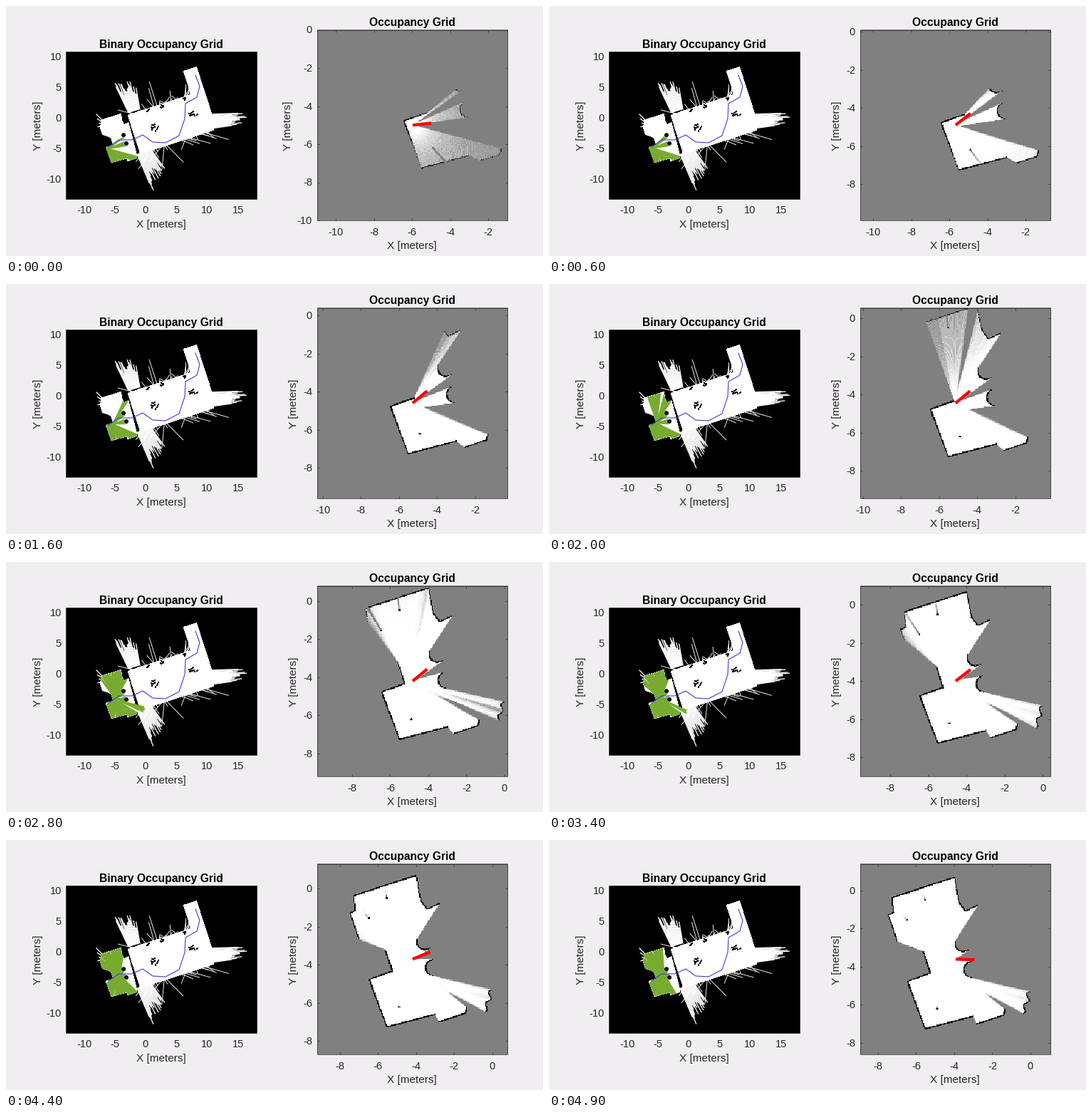
Animation of 754 by 351 pixels, one loop 5 s. Source, as a matplotlib script:

```python
import numpy as np
import matplotlib.pyplot as plt
from matplotlib.animation import FuncAnimation
from matplotlib.collections import LineCollection
from matplotlib.patches import Circle, Polygon, Rectangle

plt.rcParams["font.family"] = "Liberation Sans"

W, H, DPI = 754, 351, 100
FRAMES, INTERVAL = 50, 100
PT = 72 / DPI
CELL, MAX_RANGE, BEAMS = 0.05, 5.0, 440
FREE, HIT = 0.5, 1.3                      # log-odds steps
GRID_LEFT, GRID_TOP, ROWS, COLS = -12.0, 2.0, 240, 262
VIEW = 200                                # local window in cells
BOX_L = (84, 64, 351.5, 270.5)            # left, top, right, bottom in pixels
BOX_R = (436.5, 33.5, 704, 301)
SCALE_L, SCALE_R = 8.65, 26.75            # pixels per metre
TILT = np.radians(18)
SPEED, LAG = 0.51, 0.2
INK = "#262626"


def tilted(points):
    """Building axes to world metres."""
    c, s = np.cos(TILT), np.sin(TILT)
    return np.asarray(points) @ np.array([[c, s], [-s, c]])


def to_left(points):
    """World metres to pixels of the left panel."""
    return np.asarray(points) * [SCALE_L, -SCALE_L] + [196, 157]


def ring(x, y, r):
    a = np.linspace(0, 2 * np.pi, 17)
    return np.column_stack([x + r * np.cos(a), y + r * np.sin(a)])


def far_wall():
    """Ragged arc that only partly comes within range."""
    deg = np.linspace(-9.5, -23, 24)
    r = 5.05 - 0.1 * np.cos(2 * np.pi * (deg + 11.5) / 7)
    a = np.radians(deg)
    return np.column_stack([-5.1 + r * np.cos(a), -4.45 + r * np.sin(a)])


ROOMS = tilted([(-3.25, -5.5), (-3.4, -5.76), (-4.9, -5.76), (-4.9, -5.32),
                (-7.5, -5.17), (-7.6, -2.57), (-6.32, -2.54), (-6.33, -1.3),
                (-7.47, -0.4), (-7.5, 1.05), (-7.2, 1.1), (-7.05, 1.86),
                (-3.63, 1.86), (-3.8, 0.55), (-3.63, 0), (-2.9, 0.1)])
PILLARS = [(-3.58, -2.8), (-3.12, -4.16)]
POSTS = [(-4.92, -6.22), (-5.55, -0.5), (-6.5, -1.55)]

WALLS = [ROOMS, far_wall()]
WALLS += [ring(x, y, 0.43) for x, y in PILLARS]
WALLS += [ring(x, y, 0.05) for x, y in POSTS]
WALL_A = np.concatenate([p[:-1] for p in WALLS])
WALL_B = np.concatenate([p[1:] for p in WALLS])


def aim(t):
    """Direction to the look-ahead point: quick turn in, late turn out."""
    return np.radians(40 - 34 * np.exp(-t / 0.2) - 42 * (t / 4.9) ** 8)


def drive():
    """The robot follows its aim with a short lag."""
    dt = INTERVAL / 1000
    mid = (np.arange(FRAMES - 1) + 0.5) * dt
    a = aim(np.maximum(mid - LAG, 0))
    steps = SPEED * dt * np.column_stack([np.cos(a), np.sin(a)])
    return np.vstack([[-6, -5], [-6, -5] + np.cumsum(steps, axis=0)])


TRACK = drive()
HEADING = aim(np.arange(FRAMES) * INTERVAL / 1000)


def scan(i):
    """Beam angles and ranges of the beams that return."""
    angle = HEADING[i] + np.linspace(-np.pi, np.pi, BEAMS, endpoint=False)
    dx, dy = np.cos(angle)[:, None], np.sin(angle)[:, None]
    ex, ey = (WALL_B - WALL_A).T
    wx, wy = (WALL_A - TRACK[i]).T
    det = dx * ey - dy * ex
    det = np.where(abs(det) < 1e-9, 1e-9, det)
    dist = (wx * ey - wy * ex) / det
    along = (wx * dy - wy * dx) / det
    hit = (dist > 0) & (along >= 0) & (along <= 1)
    reach = np.where(hit, dist, np.inf).min(axis=1)
    reach += np.random.default_rng(i).normal(0, 0.01, BEAMS)
    ok = reach < MAX_RANGE
    return angle[ok], reach[ok]


def cell_index(x, y):
    col = np.clip(((x - GRID_LEFT) / CELL).astype(int), 0, COLS - 1)
    row = np.clip(((GRID_TOP - y) / CELL).astype(int), 0, ROWS - 1)
    return row * COLS + col


def build():
    """Beam tips and the grey map after every scan."""
    odds = np.zeros(ROWS * COLS)
    steps = np.arange(0, MAX_RANGE, CELL / 2)
    tips, greys = [], []
    for i, (x, y) in enumerate(TRACK):
        angle, reach = scan(i)
        c, s = np.cos(angle), np.sin(angle)
        cells = cell_index(x + np.outer(c, steps), y + np.outer(s, steps))
        ends = cell_index(x + c * (reach + 0.02), y + s * (reach + 0.02))
        free = (steps < reach[:, None] - 0.02) & (cells != ends[:, None])
        free[:, 1:] &= cells[:, 1:] != cells[:, :-1]
        odds -= FREE * np.bincount(cells[free], minlength=odds.size)
        odds += HIT * np.bincount(ends, minlength=odds.size)
        odds = np.clip(odds, -6.9, 6.9)
        greys.append((1 / (1 + np.exp(odds))).reshape(ROWS, COLS))
        tips.append(to_left(np.column_stack([x + c * reach, y + s * reach])))
    return tips, greys


TIPS, GREYS = build()

fig = plt.figure(figsize=(W / DPI, H / DPI), dpi=DPI, facecolor="#f0eef0")
ax = fig.add_axes([0, 0, 1, 1])
ax.axis("off")


def label(x, y, text, size=14.6, **kw):
    kw = {"ha": "center", "color": INK, **kw}
    return ax.text(x, y, text, fontsize=size * PT, va="baseline", **kw)


def panel(box, title, y_label_x, **style):
    left, top, right, bottom = box
    mid = (left + right) / 2
    ax.add_patch(Rectangle((left, top), right - left, bottom - top,
                           ec=INK, lw=0.5, **style))
    label(mid, top - 5.5, title, 15.65, weight="bold", color="black")
    label(mid, bottom + 40.5, "X [meters]", 15.4)
    return label(y_label_x, 168, "Y [meters]", 15.4,
                 rotation=90, rotation_mode="anchor")


# Left panel: known map
panel(BOX_L, "Binary Occupancy Grid", 49, fc="black")
for v in range(-10, 16, 5):
    label(196 + SCALE_L * v, 291, str(v))
for v in range(-10, 11, 5):
    label(78, 162 - SCALE_L * v, str(v), ha="right")

rng = np.random.default_rng(7)


def fill(points):
    ax.add_patch(Polygon(points, fc="white", ec="none", aa=False))


def hall(u0, v0, u1, v1):
    fill(to_left(tilted([(u0, v0), (u1, v0), (u1, v1), (u0, v1)])))


def rays(start, tip, width):
    ax.add_collection(LineCollection(np.stack([start, tip], axis=1),
                                     colors="white", linewidths=width * PT))


def fan(base, tips, count):
    """Ragged rays from a base line to a tip line, in pixels."""
    u = np.linspace(0, 1, count)[:, None]
    start, tip = (np.array(a) * (1 - u) + np.array(b) * u for a, b in (base, tips))
    reach = rng.uniform(0.55, 1, (count, 1))
    rays(start, start + (tip - start) * reach, 1.3)


def spikes(u0, u1, v, count):
    """Stray rays leaking through a long wall of the hall."""
    start = np.column_stack([rng.uniform(u0, u1, count), np.full(count, v)])
    away = start - np.column_stack([rng.uniform(u0, u1, count), np.full(count, -2)])
    away /= np.hypot(*away.T)[:, None]
    away[:, 1] = np.sign(away[:, 1]) * np.maximum(abs(away[:, 1]), 0.6)
    length = np.minimum(rng.exponential(1.3, (count, 1)), 4.2)
    rays(to_left(tilted(start)), to_left(tilted(start + away * length)), 0.9)


def clutter(x, y, spread, count):
    ax.scatter(*rng.normal((x, y), spread, (count, 2)).T, s=1.6, c="black",
               marker="s", linewidths=0)


fill(to_left(ROOMS))
hall(-2.6, -5.3, 9.9, 1.3)
hall(8.2, -4.8, 10.4, 5.3)
fill([(284, 152), (318, 158), (316, 164), (288, 172)])
fan([(172, 150), (188, 145)], [(151, 106), (181, 106)], 26)
fan([(184, 208), (202, 199)], [(207, 262), (224, 230)], 24)
fan([(282, 152), (288, 172)], [(344, 150), (330, 166)], 22)
fan([(135, 160), (134, 168)], [(126, 151), (128, 170)], 4)
spikes(-2, 8.2, 1.25, 40)
spikes(-2.4, 9.8, -5, 42)

for x, y in PILLARS:
    ax.add_patch(Circle(to_left((x, y)), 3, fc="black", ec="none"))
ax.add_patch(Circle((167, 157), 3.5, fc="black", ec="none"))
clutter(208, 170, (3, 3), 18)
clutter(262, 152, (3, 2), 16)
for u in (0.8, 3.2, 7):
    clutter(*to_left(tilted((u, 1))), 1.2, 7)

beams = LineCollection([], colors="#77ac30", linewidths=1.05 * PT)
ax.add_collection(beams)
ROUTE = [(144, 198), (158, 188), (177, 188), (192, 181), (206, 191), (224, 192),
         (243, 182), (251, 158), (252, 137), (268, 128), (272, 113), (266, 97)]
ax.plot(*zip(*ROUTE), color="#3b3be0", lw=0.8)
robot = Polygon(np.zeros((3, 2)), fc="none", ec="#303070", lw=0.6)
ax.add_patch(robot)

# Right panel: local map around the robot
left, top, right, bottom = BOX_R
image = ax.imshow(np.zeros((VIEW, VIEW)), cmap="gray", vmin=0, vmax=1,
                  extent=(left, right, bottom, top),
                  interpolation="nearest", aspect="auto", zorder=1)
right_y = panel(BOX_R, "Occupancy Grid", 408, fc="none", zorder=4)
TICKS = range(-10, 1, 2)
x_ticks = [label(0, 322, str(v)) for v in TICKS]
y_ticks = [label(430, 0, str(v), ha="right") for v in TICKS]
marks = LineCollection([], colors=INK, linewidths=0.5, zorder=4)
ax.add_collection(marks)
heading_line, = ax.plot([], [], color="red", lw=4.3 * PT,
                        solid_capstyle="butt", zorder=5)

ax.set_xlim(0, W)
ax.set_ylim(H, 0)


def update(i):
    (x, y), a = TRACK[i], HEADING[i]
    col = round((x - 5 - GRID_LEFT) / CELL)
    row = round((GRID_TOP - y - 5) / CELL)
    x_min, y_max = GRID_LEFT + col * CELL, GRID_TOP - row * CELL
    image.set_data(GREYS[i][row:row + VIEW, col:col + VIEW])

    segments = []
    for v, tx, ty in zip(TICKS, x_ticks, y_ticks):
        px = left + (v - x_min) * SCALE_R
        py = top + (y_max - v) * SCALE_R
        tx.set_x(px)
        ty.set_y(py + 5)
        tx.set_visible(left - 0.1 <= px <= right + 0.1)
        ty.set_visible(top - 0.1 <= py <= bottom + 0.1)
        if tx.get_visible():
            segments += [((px, top), (px, top + 3)), ((px, bottom), (px, bottom - 3))]
        if ty.get_visible():
            segments += [((left, py), (left + 3, py)), ((right, py), (right - 3, py))]
    marks.set_segments(segments)
    right_y.set_x(400 if y_ticks[0].get_visible() else 408)

    cx, cy = (left + right) / 2 + 0.7, (top + bottom) / 2
    heading_line.set_data([cx, cx + 26.5 * np.cos(a)], [cy, cy - 26.5 * np.sin(a)])

    origin = to_left((x, y))
    beams.set_segments([(origin, tip) for tip in TIPS[i]])
    corner = a + np.array([0, 2.5, -2.5])
    robot.set_xy(origin + 4 * np.column_stack([np.cos(corner), -np.sin(corner)]))
    return []


anim = FuncAnimation(fig, update, frames=FRAMES, interval=INTERVAL,
                     repeat=True, repeat_delay=0, blit=False)
plt.show()
```
